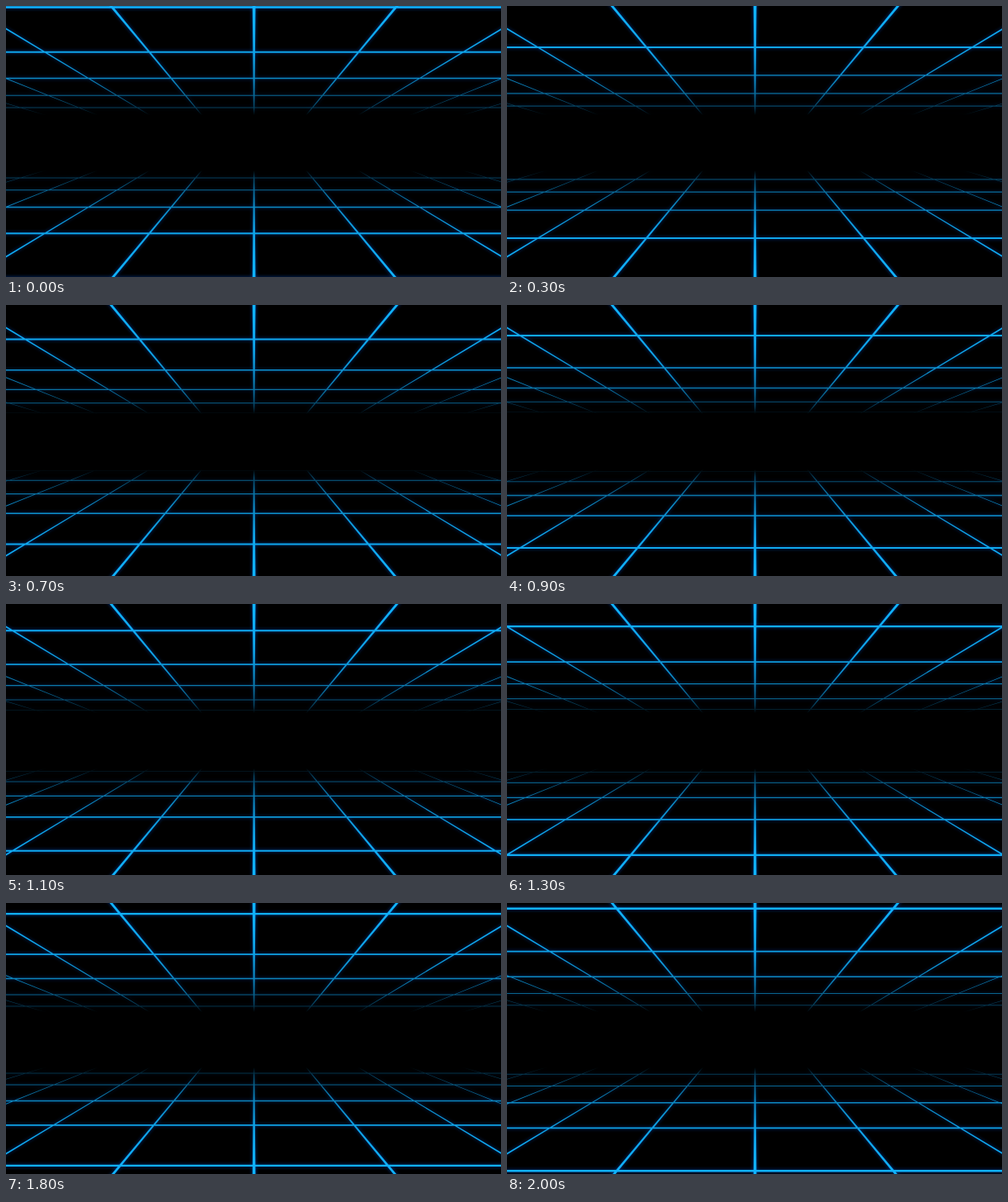
These frames come from a looping animation (600 by 328 pixels, 2.1 s). An HTML page:

```html
<!DOCTYPE html>
<html lang="en">
<head>
<meta charset="utf-8">
<title>Neon grid</title>
<style>
  html, body { margin: 0; width: 100%; height: 100%; overflow: hidden; background: #000; }
  svg { display: block; width: 600px; height: 328px; }
</style>
</head>
<body>
<svg viewBox="0 0 600 328">
  <defs>
    <linearGradient id="fade" gradientUnits="userSpaceOnUse" x1="0" y1="0" x2="0" y2="132">
      <stop offset="0" stop-color="#fff"/>
      <stop offset=".45" stop-color="#fff" stop-opacity=".9"/>
      <stop offset=".68" stop-color="#fff" stop-opacity=".76"/>
      <stop offset=".82" stop-color="#fff" stop-opacity=".58"/>
      <stop offset=".93" stop-color="#fff" stop-opacity=".36"/>
      <stop offset="1" stop-color="#fff" stop-opacity="0"/>
    </linearGradient>
    <mask id="fog" maskUnits="userSpaceOnUse" x="0" y="-10" width="600" height="142" style="mask-type: alpha">
      <rect y="-10" width="600" height="142" fill="url(#fade)"/>
    </mask>
    <filter id="blur" filterUnits="userSpaceOnUse" x="-10" y="-20" width="620" height="170">
      <feGaussianBlur stdDeviation="2"/>
    </filter>
    <path id="grid"/>
    <g id="plane" mask="url(#fog)">
      <use href="#grid" fill="#0050d0" opacity=".75" filter="url(#blur)"/>
      <use href="#grid" fill="#10b4ff"/>
    </g>
  </defs>
  <rect width="600" height="328" fill="#000"/>
  <use href="#plane"/>
  <use href="#plane" transform="matrix(1 0 0 -1 0 331)"/>
</svg>
<script>
  const VANISH = { x: 300.6, y: 208 };
  const DEPTH = 579;        // projected drop of a row at distance 1
  const SPREAD = 0.833;     // sideways slope between neighbouring rails
  const RAIL = 0.0175;      // rail width relative to its drop
  const STEP_MS = 100, STEPS = 21, ADVANCE = 0.0463;
  const grid = document.getElementById('grid');

  const polygon = points => 'M' + points.map(p => p.map(v => v.toFixed(2)).join()).join('L') + 'Z';

  function rail(i) {
    const at = (drop, side) => [VANISH.x + drop * (i * SPREAD + side * RAIL / 2), VANISH.y - drop];
    return polygon([at(220, -1), at(220, 1), at(74, 1), at(74, -1)]);
  }

  function row(distance) {
    const drop = DEPTH / distance, half = drop / 170, y = VANISH.y - drop;
    return polygon([[-10, y - half], [610, y - half], [610, y + half], [-10, y + half]]);
  }

  const rails = [-4, -3, -2, -1, 0, 1, 2, 3, 4].map(rail).join('');

  function draw(ms) {
    const step = Math.floor(ms / STEP_MS) % STEPS;
    const nearest = 2.803 - step * ADVANCE;
    const rows = [0, 1, 2, 3, 4, 5].map(k => row(nearest + k)).join('');
    grid.setAttribute('d', rails + rows);
  }

  const start = performance.now();
  function tick() {
    draw(performance.now() - start);
    requestAnimationFrame(tick);
  }
  tick();
</script>
</body>
</html>
```
